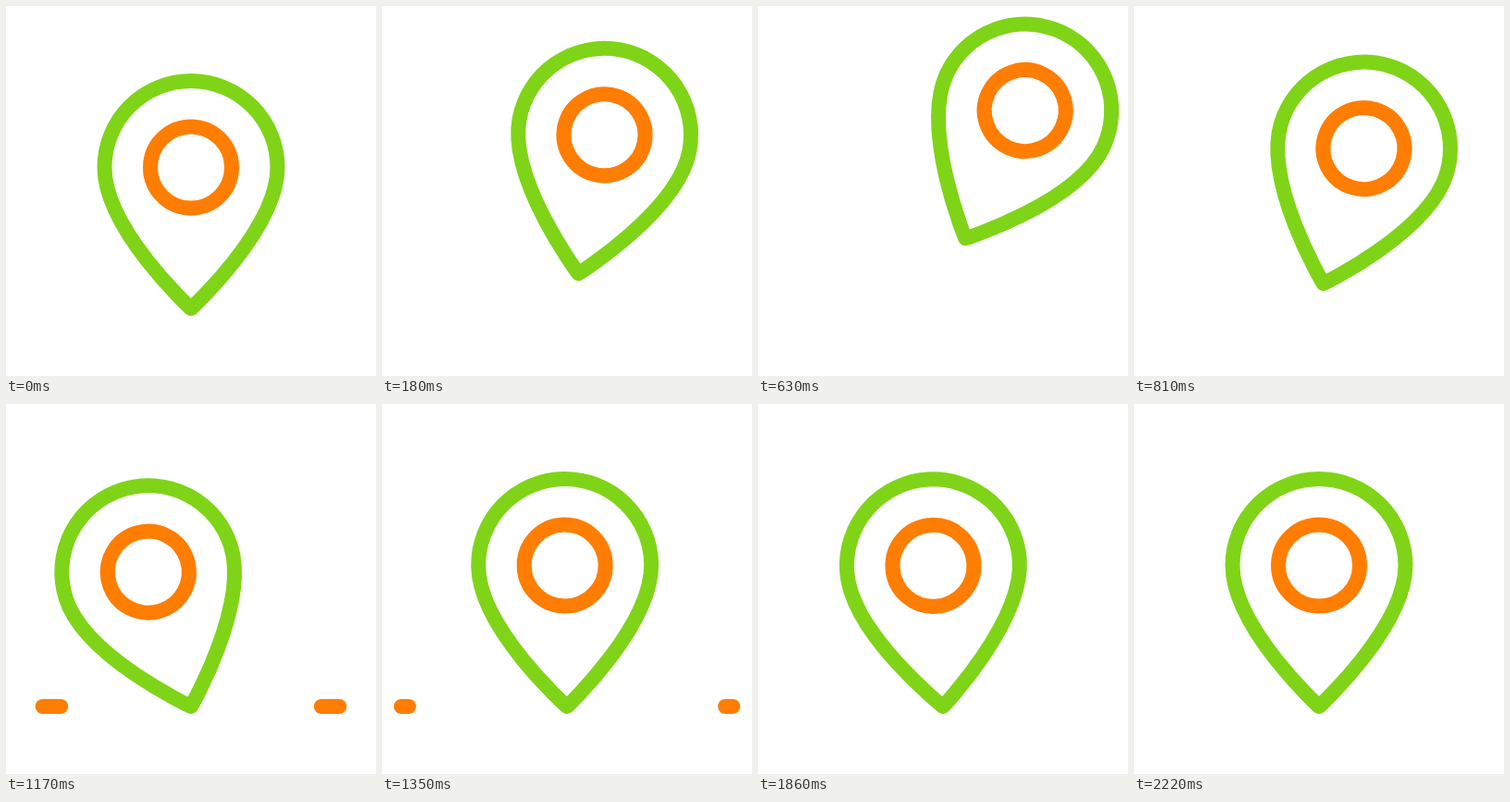
An HTML page for the animation above (2.96 s loop, 400 by 400 pixels).

```html
<!DOCTYPE html>
<html lang="en">
<head>
<meta charset="utf-8">
<title>Location pin</title>
<style>
  html, body { margin: 0; width: 100%; height: 100%; overflow: hidden; background: #fff; }
  svg { display: block; width: 100%; height: 100%; }
  g { fill: none; stroke-width: 16; stroke-linecap: round; stroke-linejoin: round; }
  .green { stroke: #7fd417; }
  .orange { stroke: #ff7d00; }
</style>
</head>
<body>
<svg viewBox="0 0 400 400">
  <g id="sparks" class="orange"><path id="left"/><path id="right"/></g>
  <!-- the pin is drawn around its tip -->
  <g id="pin">
    <path class="green" d="M-93.5-152.5a93.5 93.5 0 0 1 187 0C93.5-85.5 0 0 0 0S-93.5-85.5-93.5-152.5Z"/>
    <circle class="orange" cy="-152.5" r="44"/>
  </g>
</svg>
<script>
const LOOP = 2960, STEP = 30, GROUND = 327;
const $ = id => document.getElementById(id);

const smooth = t => t * t * (3 - 2 * t);

// cubic-bezier(.33, 0, .2, 1)
function settle(t) {
  let lo = 0, hi = 1;
  for (let i = 0; i < 24; i++) {
    const s = (lo + hi) / 2, r = 1 - s;
    if (.99 * s * r * r + .6 * s * s * r + s * s * s < t) lo = s; else hi = s;
  }
  return smooth(lo);
}

// Each key: time in ms, value, easing towards that value
const tracks = {
  x: [[0, 200], [575, 226, settle], [580, 226, smooth], [895, 200, smooth]],
  y: [[0, GROUND], [575, 247.4, settle], [580, 247.4, smooth], [957, GROUND, smooth]],
  angle: [[0, 0], [615, 25, settle], [700, 25, smooth], [1100, -19.8, smooth],
          [1523, 10, smooth], [1870, -4, smooth], [2220, 0, smooth]],
  outer: [[960, 100], [1408, 20, settle]],
  inner: [[960, 100], [1600, 20, settle]]
};

function valueAt(keys, t) {
  if (t <= keys[0][0]) return keys[0][1];
  for (let i = 1; i < keys.length; i++) {
    const [t0, v0] = keys[i - 1], [t1, v1, ease] = keys[i];
    if (t < t1) return v0 + (v1 - v0) * ease((t - t0) / (t1 - t0));
  }
  return keys[keys.length - 1][1];
}

function draw(t) {
  const [x, y, angle, outer, inner] = Object.values(tracks).map(k => valueAt(k, t));
  $('pin').setAttribute('transform', `translate(${x} ${y}) rotate(${angle})`);
  $('sparks').style.display = t > 960 && t < 1610 ? '' : 'none';
  $('left').setAttribute('d', `M${inner} ${GROUND}L${outer - .01} ${GROUND}`);
  $('right').setAttribute('d', `M${400 - inner} ${GROUND}L${400.01 - outer} ${GROUND}`);
}

const start = performance.now();
function tick() {
  const t = (performance.now() - start) % LOOP;
  draw(Math.floor((t + .5) / STEP) * STEP);
  requestAnimationFrame(tick);
}
tick();
</script>
</body>
</html>
```
